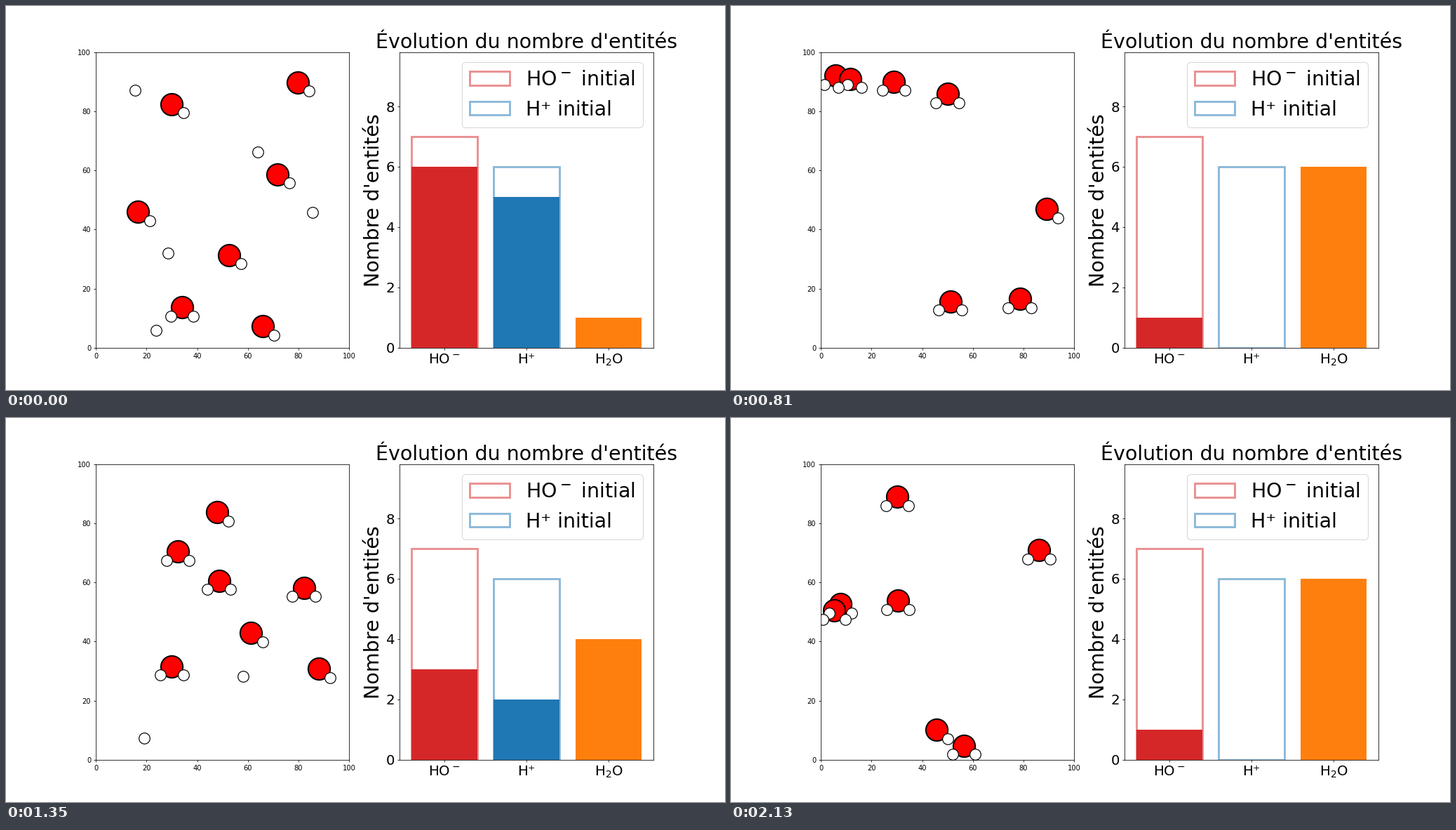
Write a matplotlib script that moves like this. It is 1025 px wide and 547 px high and loops after 2.16 s.

```python
import numpy as np
import matplotlib.pyplot as plt
from matplotlib.animation import FuncAnimation

W, H = 1025, 547
DPI = W / 14.4
STEPS = 36                      # the reaction runs twice per loop
LOW, HIGH = 4, 96               # walls the particles bounce on
BOND = np.array([4.5, -3.0])    # hydrogen position relative to oxygen
MIRROR = np.array([-1, 1])
BIG, MEDIUM = 28.8, 20

plt.rcParams["font.family"] = "DejaVu Sans"
rng = np.random.default_rng(4)


def fly(start, goal, duration):
    """Constant velocity with wall bounces, reaching goal after duration."""
    a, b = (np.array([start, goal]) - LOW) / (HIGH - LOW)
    images = np.array([b, 2 - b, -b])       # goal seen through the walls
    aim = images[rng.integers(3, size=2), [0, 1]] if duration > 8 else b
    velocity = (aim - a) / duration

    def position(t):
        bounced = 1 - np.abs((a + velocity * t) % 2 - 1)
        return LOW + (HIGH - LOW) * bounced
    return position


# each oxygen flies through two points, MID steps apart
MID = 9
oxygen = [fly(a, b, MID) for a, b in [
    ((34.0, 13.7), (30.0, 31.6)),
    ((30.0, 82.4), (32.3, 70.5)),
    ((71.8, 58.7), (82.1, 58.2)),
    ((16.7, 45.9), (48.6, 60.6)),
    ((65.9, 7.3), (87.9, 30.8)),
    ((52.7, 31.4), (61.3, 42.9)),
    ((79.6, 89.8), (47.9, 83.8)),
]]

# the first oxygen is already water, the last one stays alone
REACTIONS = [3, 5, 8, 14, 27]
bound_at = np.array([0, *REACTIONS, STEPS])
IONS = [
    [(15.6, 87.0)],
    [(63.9, 66.2)],
    [(28.5, 32.0)],
    [(85.5, 45.7), (58.1, 28.3)],
    [(23.8, 6.0), (19.1, 7.4)],
]


def ion_path(places, partner, end):
    """Fly past the given places, then onto the partner oxygen."""
    meet = partner(end) + BOND * MIRROR
    if len(places) == 1:
        return fly(places[0], meet, end)
    first = fly(*places, MID)
    last = fly(places[1], meet, end - MID)
    return lambda t: first(t) if t <= MID else last(t - MID)


ions = [ion_path(p, o, end) for p, o, end in zip(IONS, oxygen[1:], REACTIONS)]

fig, (box, chart) = plt.subplots(
    1, 2, figsize=((W + 0.01) / DPI, (H + 0.01) / DPI), dpi=DPI)

box.set_xlim(0, 100)
box.set_ylim(0, 100)
box.tick_params(labelsize=10)
big = box.scatter([], [], s=1000, c="red", edgecolors="black",
                  linewidths=2, zorder=2)
small = box.scatter([], [], s=250, c="white", edgecolors="black",
                    linewidths=1.2, zorder=2.2)

names = ["HO$^-$", "H⁺", "H$_2$O"]
for x, (count, color) in enumerate([(7, "tab:red"), (6, "tab:blue")]):
    chart.bar(x, count, fill=False, edgecolor=color, linewidth=3,
              alpha=0.5, label=names[x] + " initial")
bars = chart.bar(range(3), [6, 5, 1],
                 color=["tab:red", "tab:blue", "tab:orange"])
chart.set_xlim(-0.54, 2.54)
chart.set_ylim(0, 9.8)
chart.set_xticks(range(3), names)
chart.set_yticks(range(0, 9, 2))
chart.tick_params(labelsize=MEDIUM)
chart.set_title("Évolution du nombre d'entités", fontsize=BIG)
chart.set_ylabel("Nombre d'entités", fontsize=BIG)
chart.legend(loc="upper right", fontsize=BIG)


def draw(frame):
    step = frame % STEPS
    centers = np.array([path(step) for path in oxygen])
    water = bound_at <= step
    free = [path(step) for path, end in zip(ions, REACTIONS) if step < end]
    big.set_offsets(centers)
    small.set_offsets(np.vstack(
        [centers + BOND, centers[water] + BOND * MIRROR, *free]))

    made = water.sum()
    for bar, count in zip(bars, (7 - made, 6 - made, made)):
        bar.set_height(count)
    return [big, small, *bars]


anim = FuncAnimation(fig, draw, frames=2 * STEPS, interval=30,
                     init_func=lambda: draw(0), repeat=True, repeat_delay=0)
plt.show()
```
